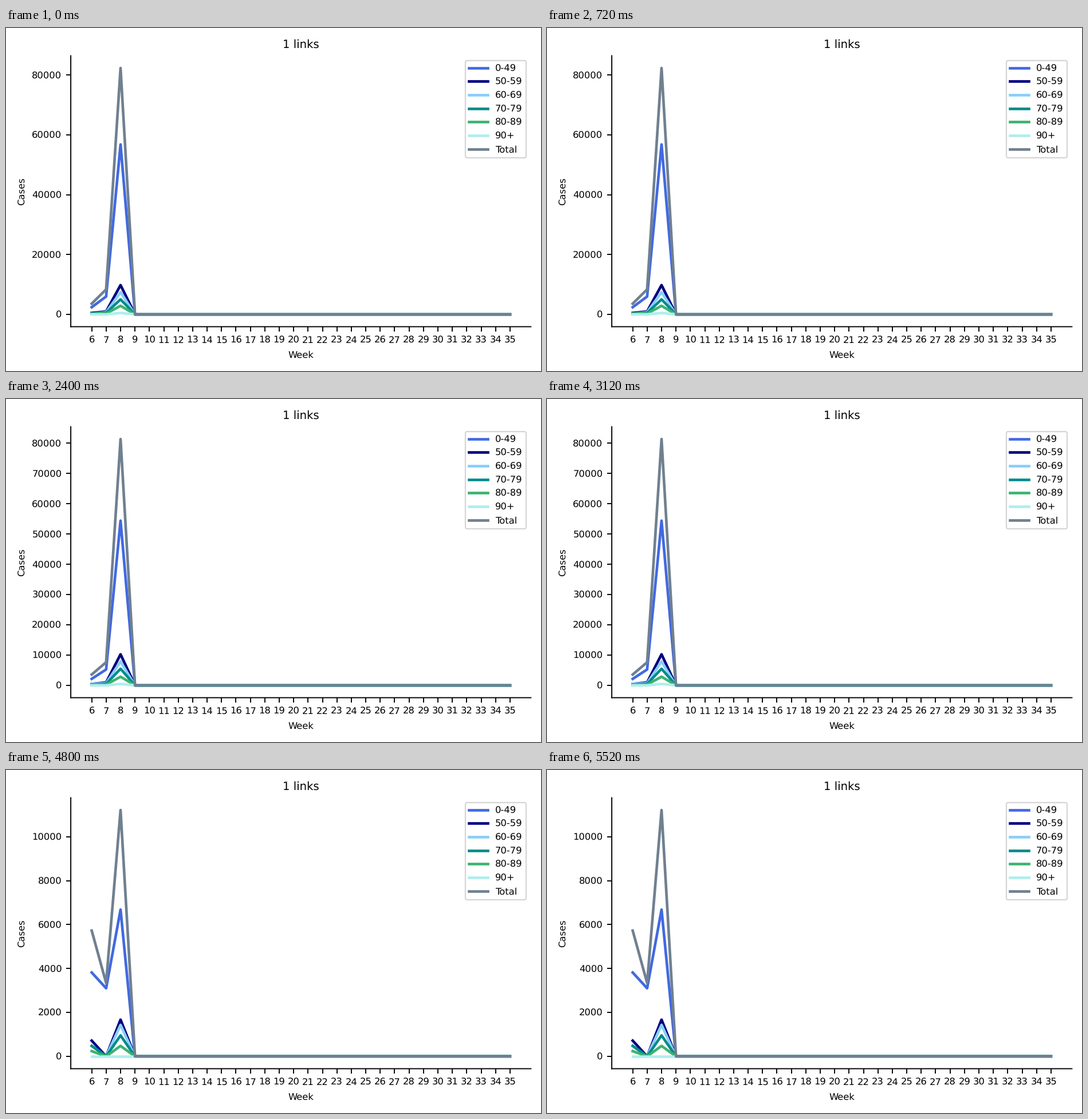
A matplotlib script for the animation above (6000 ms loop, 934x600 px).

```python
import numpy as np
import matplotlib.pyplot as plt
from matplotlib.animation import FuncAnimation

W, H, DPI = 934, 600, 64
LEFT, RIGHT, TOP, BOTTOM = 113.1, 916.4, 48.5, 522.5


def px(v):
    """Pixels to points."""
    return v * 72 / DPI


tick = {"major.size": px(8.2), "major.pad": px(8.2), "major.width": px(1.9)}
plt.rcParams.update({
    "font.family": "DejaVu Sans",
    "font.size": px(16.4),
    "text.hinting": "no_hinting",
    "axes.linewidth": px(1.9),
    "patch.linewidth": px(2.3),
    "lines.linewidth": px(4.65),
    **{f"{axis}tick.{key}": v for axis in "xy" for key, v in tick.items()},
    "ytick.major.pad": px(7.5),
})

GROUPS = {
    "0-49": "royalblue",
    "50-59": "navy",
    "60-69": "lightskyblue",
    "70-79": "darkcyan",
    "80-89": "mediumseagreen",
    "90+": "paleturquoise",
    "Total": "slategray",
}
WEEKS = np.arange(6, 36)
UNIT = 238.7  # cases per sampled person

# Sampled persons in the first three weeks: everyone, and those under 50
RUNS = [
    ((15, 35, 345), (10, 25, 238)),
    ((19, 28, 162), (10, 19, 109)),
    ((15, 32, 341), (9, 22, 228)),
    ((16, 92, 128), (9, 61, 96)),
    ((24, 14, 47), (16, 13, 28)),
]
# Above 50 the share of a group falls evenly with age
shares = np.linspace(4, 0.2, 5)
shares /= shares.sum()


def curves(total, young):
    """Cases per group and week, in the order of GROUPS."""
    total, young = np.array(total), np.array(young)
    older = np.round(np.outer(shares, total - young))
    cases = np.zeros((len(GROUPS), len(WEEKS)))
    cases[:, :len(total)] = np.vstack([young, older, total]) * UNIT
    return cases


fig = plt.figure(figsize=(W / DPI, H / DPI), dpi=DPI, facecolor="white")
ax = fig.add_axes([LEFT / W, 1 - BOTTOM / H, (RIGHT - LEFT) / W, (BOTTOM - TOP) / H])
ax.spines[["top", "right"]].set_visible(False)
for side in ("left", "bottom"):
    ax.spines[side].set_snap(False)
ax.set_title("1 links", pad=px(13.6))
ax.set_xlabel("Week")
ax.set_ylabel("Cases")
ax.xaxis.set_label_coords((LEFT + RIGHT) / 2 / W, 1 - 564.3 / H, transform=fig.transFigure)
ax.yaxis.set_label_coords(36.5 / W, 1 - (TOP + BOTTOM) / 2 / H, transform=fig.transFigure)
ax.set_xticks(WEEKS)
lines = [ax.plot(WEEKS, 0 * WEEKS, color=color, label=name)[0]
         for name, color in GROUPS.items()]
ax.legend(loc="upper right")


def draw(i):
    for line, row in zip(lines, curves(*RUNS[i])):
        line.set_ydata(row)
    ax.relim()
    ax.autoscale_view()
    return lines


anim = FuncAnimation(fig, draw, frames=len(RUNS), interval=1200,
                     repeat=True, repeat_delay=0, blit=False)
plt.show()
```
